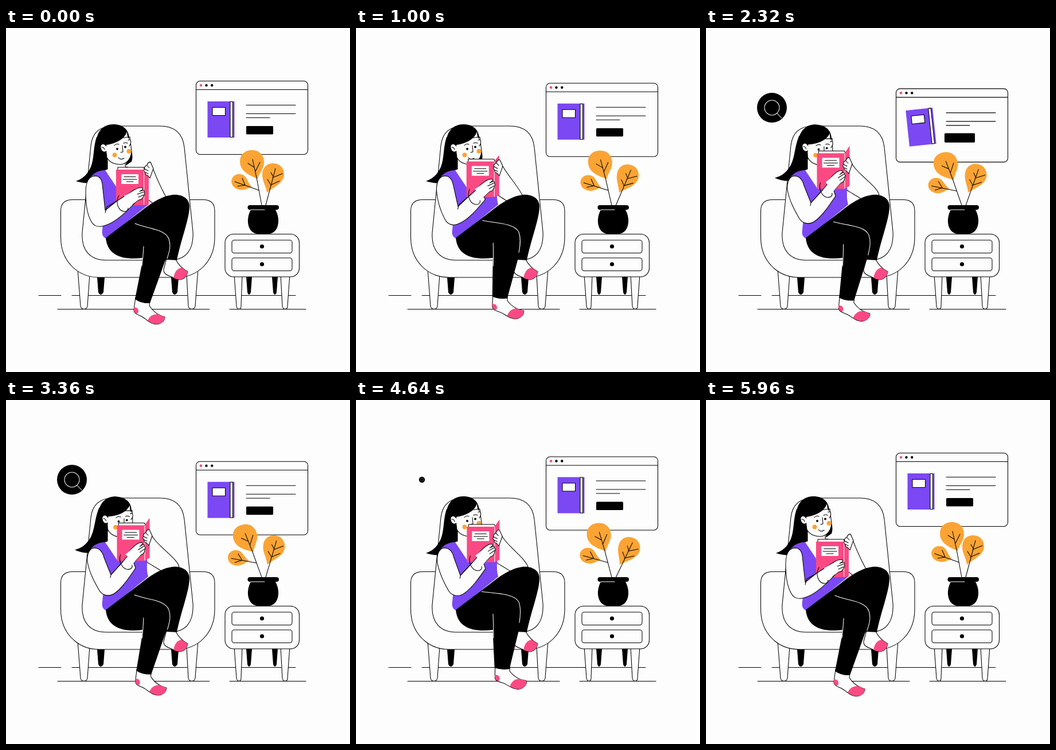
An HTML page for the animation above (6000 ms loop, 600 by 600 pixels).

```html
<!DOCTYPE html>
<html lang="en">
<head>
<meta charset="utf-8">
<title>Reading at home</title>
<style>
html, body { margin: 0; width: 100%; height: 100%; overflow: hidden; background: #fdfdfd; }
svg { display: block; width: 100vw; height: 100vh; }
.s { fill: #fdfdfd; stroke: #000; }
.l { fill: none; stroke: #000; }
.w { fill: none; stroke: #fdfdfd; }
.r { fill: #fb4a83; }
.p { fill: #7b48f4; }
.o { fill: #fba434; }
</style>
</head>
<body>
<svg viewBox="0 0 600 600" stroke-width="1.05" stroke-linecap="round" stroke-linejoin="round">
  <path class="l" d="M57 466.500H96M115 466.500H505M90 490.500H355M390 490.500H523"/>

  <!-- armchair -->
  <path d="M159 435H172L170 461Q165 469 161 461ZM288 435H301L299 461Q294 469 290 461Z"/>
  <path class="s" d="M125 420L130 485C131 492 141 492 142 485L146 430ZM315 430L318 485C319 492 329 492 330 485L335 420Z"/>
  <path class="s" d="M95.500 319Q95.500 299.500 116 299.500H344Q364 299.500 364 319V365C364 407 335 435 297 435H163C125 435 95.500 407 95.500 365Z"/>
  <path class="s" d="M133 357L148 205Q152 171 187 171H268C293 171 308 182 311 208L326 355C328 388 313 405 285 405H175C147 405 131 388 133 357Z"/>

  <!-- browser window -->
  <g id="win">
    <rect class="s" x="331.500" y=".5" width="195" height="128" rx="7"/>
    <path class="l" d="M331.500 15.500H526.500M419 42.500H505M419 57.500H505M419 64.500H460"/>
    <circle class="r" cx="340" cy="8" r="2.300"/>
    <circle cx="349.500" cy="8" r="2.200"/><circle cx="359.200" cy="8" r="2.200"/>
    <g id="ad">
      <path class="p" d="M351.500 36H398.500V99H351.500Z"/>
      <path class="s" d="M391 36.500H395.500V98.500H391ZM360 46.500H382.500V60.500H360Z"/>
    </g>
    <rect id="btn" x="419" y="79" width="47" height="14.500" rx="1.500"/>
  </g>

  <!-- cabinet -->
  <path d="M419 434H429L427 461Q424 469 421 461ZM464 434H474L472 461Q469 469 466 461Z"/>
  <path class="s" d="M398 430L402 485C403 492 410 492 410 485L412 430ZM479 430L482 485C483 492 491 492 491 485L495 430Z"/>
  <rect class="s" x="382" y="359.500" width="129.500" height="74.500" rx="15"/>
  <rect class="s" x="394" y="370" width="105" height="22.500" rx="4"/>
  <rect class="s" x="394" y="401" width="105" height="22.500" rx="4"/>
  <circle cx="446.500" cy="381" r="3.600"/><circle cx="446.500" cy="412" r="3.600"/>

  <!-- plant -->
  <g id="stemA">
    <path class="o" d="M439 263C430 259 408 252 408 233C408 220 417 213 429 213C442 213 450 222 450 234C450 246 442 252 439 263Z"/>
    <path class="o" d="M429 277C423 279 415 284 407 282C397 280 391 272 394 263C398 254 410 252 417 259C422 265 423 272 429 277Z"/>
    <path class="l" d="M430 229L437 261L446 309M443 234L435 250M422 236L433 243M399 268L441 283M412 262L417 274M404 276L417 274"/>
  </g>
  <g id="stemB">
    <path class="o" d="M455 287C454 276 447 268 447 256C447 243 455 236 466 236C478 236 485 245 485 255C485 270 468 277 455 287Z"/>
    <path class="l" d="M470 245L453 309M482 254L465 261M462 252L466 259M477 267L461 274M456 264L461 272"/>
  </g>
  <rect x="421.500" y="309" width="54.500" height="8" rx="4"/>
  <path d="M427 317C417 335 422 359 440 359H457C475 359 480 335 470 317Z"/>
  <path class="w" d="M427 317H451"/>

  <!-- reader -->
  <g class="head">
    <path d="M158 190C150 215 156 236 141 254Q134 263 122 267C140 273 160 272 172 257L185 240L178 200ZM214 200C218 210 223 222 219 233L209 240Z"/>
  </g>
  <path class="s" d="M177 228V246L165 250L190 300H235L238 249L208 242V228Z"/>
  <path id="armR" class="s"/>
  <path class="p" d="M146 262Q156 248 173 248L195 281L216 250L238 250C252 272 242 288 248 308L175 367Q166 365 168 352L171 320Z"/>
  <g class="head">
    <path class="s" d="M172 195L176 226C181 235 190 238 200 238C211 237 218 228 219 215L216 190Z"/>
    <path class="s" d="M213 196C217 192 220 199 215 206"/>
    <path d="M160 216C152 190 164 168 187 168C205 168 215 178 215 194Q211 190 211 181C206 195 190 202 175 204L172 218Z"/>
    <path class="s" d="M175 206C170 199 164 203 165 209C166 215 171 218 175 215"/>
    <path class="l" d="M167 208Q171 208 172 212M203 205L204 216L200 217M196 226Q200 231 206 227M189 205Q192 201 197 203M205 201Q209 199 212 201"/>
    <circle cx="194" cy="211" r="1.900"/><circle cx="208" cy="207.500" r="1.900"/>
    <circle class="o" cx="189.500" cy="221.500" r="3.900"/><circle class="o" cx="214.500" cy="215" r="4"/>
  </g>

  <path class="s" d="M280 402L275 421C274 431 286 432 295 437C305 442 315 437 317 425Q303 418 295 402Z"/>
  <path class="r" d="M292 436Q295 420 306 418L317 425C315 438 304 441 292 436Z"/>
  <g id="foot">
    <path class="s" d="M226 470L223 491C222 500 234 500 241 506C249 512 257 519 267 516Q277 512 277 504C266 501 257 496 250 484L251 474Z"/>
    <path class="r" d="M247 510Q253 498 265 499L277 504Q277 513 267 516C259 518 253 514 247 510ZM223 487Q231 487 231 494Q230 499 228 498Q222 497 223 487Z"/>
  </g>
  <path d="M174 366L236 319C254 305 270 294 290 291C309 289 321 299 320 313C319 335 305 370 298 405L278 404L238 401C205 405 177 398 174 366Z"/>
  <path id="shin"/>
  <path id="knee" class="w"/>

  <g id="book">
    <path class="s" d="M195 248V243H240L242 248Z"/>
    <path id="flap" class="r"/>
    <path class="r" d="M192 247H241V309H192Z"/>
    <path class="w" d="M240.500 248V308"/>
    <path fill="#fdfdfd" d="M201 255H231V272H201Z"/>
    <path class="l" d="M206 259.500H226M204 264H228M210 268H222"/>
  </g>
  <path id="armL" class="s"/>
  <path id="armLine" class="l"/>
  <g id="handL">
    <path class="s" d="M208 293L221 284Q232 277 238 279Q241 281 233 285Q243 281 241 286Q243 289 240 293Q238 300 231 300L220 308"/>
    <path class="l" d="M229 290L240 286M231 295L240 291"/>
    <path fill="#fdfdfd" d="M206 293L221 285L232 299L216 311Z"/>
    <path class="l" d="M197 292C190 304 196 320 207 320Q213 320 213 314"/>
  </g>
  <g id="handR">
    <path class="s" d="M252 234Q248 233 246 239Q240 242 242 246Q239 249 243 252Q242 256 247 257L251 262L257 245Z"/>
    <path class="l" d="M246 240L250 244M242 246L248 249M243 252L248 254"/>
  </g>

  <g id="search">
    <circle r="26"/>
    <path class="w" d="M13 0A13 13 0 1 1 -13 0A13 13 0 1 1 13 0M9 10L17 18"/>
  </g>
</svg>
<script>
const $ = id => document.getElementById(id);
const heads = document.querySelectorAll('.head');
const wave = (t, period) => (1 - Math.cos(2 * Math.PI * t / period)) / 2;
const part = (t, a, b) => Math.min(1, Math.max(0, (t - a) / (b - a)));
const ease = (t, a, b) => wave(part(t, a, b), 2);
const hold = (t, a, b, c, d) => ease(t, a, b) - ease(t, c, d);
const set = (id, value) => $(id).setAttribute('transform', value);

// Blends two paths that share the same commands.
function morph(id, from, to, u) {
  const ends = to.match(/-?[\d.]+/g);
  let i = 0;
  $(id).setAttribute('d', from.replace(/-?[\d.]+/g, n => +n + (ends[i++] - n) * u));
}

function draw(t) {
  const slow = wave(t, 6000), fast = wave(t, 3000);
  set('win', `translate(0 ${92 + 15.2 * slow})`);
  set('stemA', `rotate(${-9.7 * slow} 447 309)`);
  set('stemB', `rotate(${11 * fast} 455 312)`);

  const tap = Math.sin(Math.PI * part(t, 1980, 2660));
  set('ad', `rotate(${-6 * tap} 375 67.5)`);
  set('btn', `translate(442.5 86.25) scale(${1 + .13 * tap}) translate(-442.5 -86.25)`);

  const q = part(t, 1320, 1880) - 1;
  const pop = 1 + 2.7 * q ** 3 + 1.7 * q * q;
  const size = t < 1320 ? 0 : Math.max(0, pop - ease(t, 3900, 4950));
  set('search', `translate(115 139) scale(${size})`);

  const tilt = 5 * hold(t, 1300, 1950, 3450, 4000);
  heads.forEach(h => h.setAttribute('transform', `rotate(${tilt} 185 240)`));

  set('foot', `translate(${18 * fast} ${-9.5 * fast}) rotate(${-7 * fast} 238 478)`);
  morph('shin', 'M240 370L237 412L225 473Q236 481 251 480L279 402L286 370Z',
    'M239 370L239 412L242 467Q254 471 268 469L284 402L287 370Z', fast);
  morph('knee', 'M225 341C245 350 278 350 284 368C288 380 285 390 281 402M240 381Q239 400 237 415',
    'M219 334C243 337 276 337 284 352C288 363 287 375 285 388M239 373Q240 398 240 415', fast);

  const u = hold(t, 200, 1800, 4360, 5800);
  set('book', `translate(${1.5 * u} ${-28.5 * u})`);
  morph('flap', 'M240 247L249 238L249 308L240 309Z', 'M240 247L249 234L249 304L240 309Z', u);
  set('handL', `translate(${2 * u} ${-28 * u}) rotate(${-12 * u} 225 292)`);
  set('handR', `translate(${-2 * u} ${-8 * u})`);
  morph('armR', 'M252 234C258 250 266 272 282 300L259 308L246 298L244 250Z',
    'M250 228C258 252 298 274 302 291L271 298L246 283L240 240Z', u);
  morph('armL', 'M155 258C143 259 139 272 139 286C139 302 140 320 147 334C152 346 160 348 171 345C190 340 207 323 225 305L212 290L193 302L173 318L168 272Q166 258 155 258Z',
    'M155 258C145 258 141 270 142 282C145 300 153 315 162 331C168 342 181 344 191 336C203 327 214 311 226 293L217 266L203 283L183 305L171 275Q167 259 155 258Z', u);
  morph('armLine', 'M173 322L176 312L193 302', 'M182 310L183 305L203 283', u);
}

function frame(now) {
  draw(now % 6000);
  requestAnimationFrame(frame);
}
requestAnimationFrame(frame);
</script>
</body>
</html>
```
